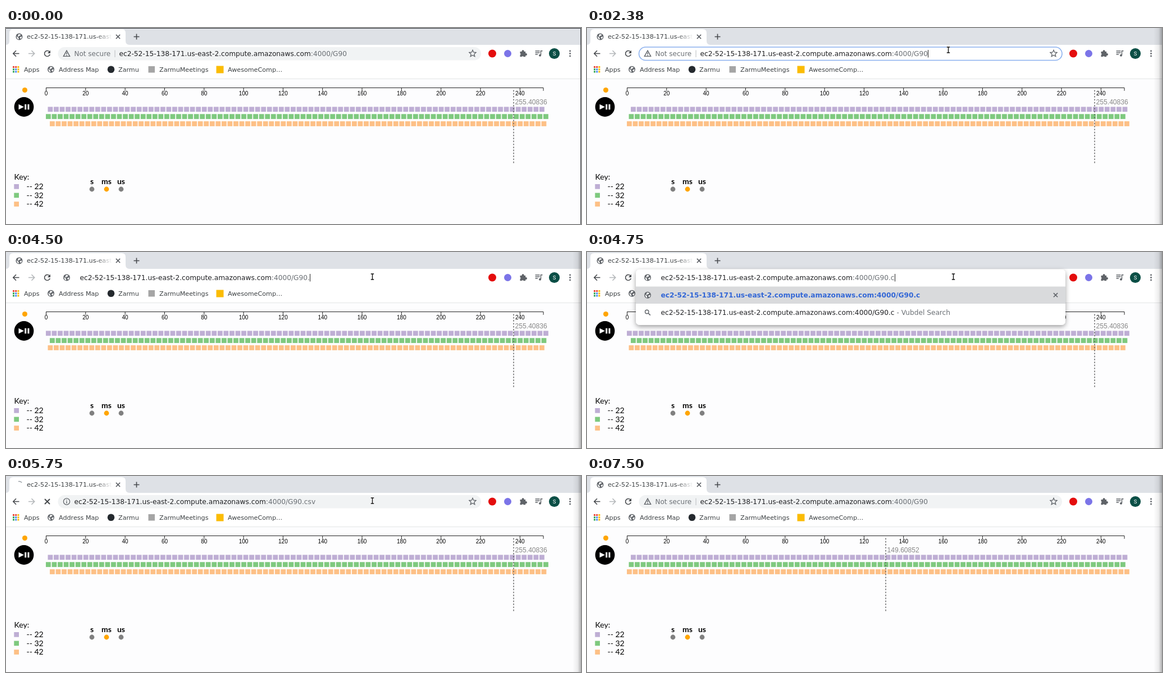
Animation, 1024 px wide and 349 px high, one loop 8000 ms. Source, as an HTML page:

```html
<!DOCTYPE html>
<html lang="en">
<head>
<meta charset="utf-8">
<title>Timeline viewer</title>
<style>
html, body { margin: 0; width: 100%; height: 100%; overflow: hidden; background: #fff; }
svg { display: block; width: 1024px; height: 349px; }
text { white-space: pre; }
.ui { font-family: "DejaVu Sans", sans-serif; font-size: 11.15px; fill: #3c4043; }
.url { font-family: "DejaVu Sans", sans-serif; font-size: 12.2px; fill: #202124; }
.dim { fill: #6b7075; }
.pick { font-weight: bold; fill: #3367d6; }
.axis { font-family: "Liberation Sans", Arial, sans-serif; font-size: 10px; text-anchor: middle; }
.value { font-family: "Liberation Sans", Arial, sans-serif; font-size: 12.1px; fill: #888; }
.key { font-family: Lato, sans-serif; font-size: 14px; }
.unit { font-weight: bold; text-anchor: middle; }
.line { fill: none; stroke: #5f6368; stroke-width: 1.6; }
.dark { stroke: #46494d; }
</style>
</head>
<body>
<svg id="stage" viewBox="0 0 1024 349">
  <defs>
    <linearGradient id="edge"><stop offset="0" stop-opacity="0"/><stop offset=".6" stop-opacity=".07"/><stop offset="1" stop-opacity=".3"/></linearGradient>
    <linearGradient id="fade"><stop offset="0" stop-color="#fff" stop-opacity="0"/><stop offset="1" stop-color="#fff"/></linearGradient>
    <filter id="shadow" x="-10%" y="-20%" width="120%" height="150%"><feDropShadow dx="0" dy="3" stdDeviation="4" flood-opacity=".38"/></filter>
    <clipPath id="titleClip"><rect x="30" y="4" width="158" height="24"/></clipPath>
    <g id="globe">
      <circle r="6" fill="#5f6368"/>
      <path d="M-4.6-1.6Q-3.6 1-1.6 1.2L-.8 3.2-1 5Q-4.8 3.6-4.6-1.6ZM-1-4.8 3-3.8 1.6-1.8-.4-1.4-1 .2-2.6-.8-1.8-3ZM2.4.2 4.8-.2Q4.8 2.6 2.6 4L1 1.6Z" fill="#fff"/>
    </g>
    <path id="cross" d="M-3.6-3.6 3.6 3.6M3.6-3.6-3.6 3.6"/>
  </defs>

  <rect width="1024" height="349" fill="#fdfdfe"/>
  <rect id="strip" width="1024" height="31" fill="#dee1e6"/>
  <path d="M0 30Q6 30 6 23V9Q6 2 13 2H206Q213 2 213 9V23Q213 30 220 30V31H0Z" fill="#fff"/>
  <rect y="30" width="1024" height="60.5" fill="#fff"/>
  <rect y="90" width="1024" height="1" fill="#e3e4e6"/>
  <use id="favicon" href="#globe" x="23.5" y="15.5"/>
  <path id="spinner" class="line" d="M-1.5-5.8A6 6 0 0 1 4.6-3.8" style="stroke:#9aa0a6"/>
  <text class="ui" x="37" y="19.3" clip-path="url(#titleClip)">ec2-52-15-138-171.us-east-2.compute</text>
  <rect x="160" y="6" width="29" height="20" fill="url(#fade)"/>
  <use class="line" href="#cross" x="199.5" y="15.5"/>
  <path class="line dark" d="M227.5 15.5H237.5M232.5 10.5V20.5"/>

  <path class="line dark" d="M23.5 45.5H13M18 40.3 12.8 45.5 18 50.7"/>
  <path class="line" d="M40 45.5H50.5M45.5 40.3 50.7 45.5 45.5 50.7" style="stroke:#b4b7ba"/>
  <g id="reload"><path class="line dark" d="M77.3 42.2A5 5 0 1 0 78.3 47"/><path d="M79 39.8V45H73.8Z" fill="#46494d"/></g>
  <use id="stop" class="line dark" href="#cross" transform="translate(73.5 45.5) scale(1.25)"/>

  <rect id="pill" x="92.5" y="34" width="753.5" height="23.5" rx="11.75"/>
  <g id="star"><path class="line" style="stroke-width:1.3" d="M831 39.3 832.7 43.2 837 43.6 833.8 46.4 834.8 50.6 831 48.4 827.2 50.6 828.2 46.4 825 43.6 829.3 43.2Z"/></g>

  <circle cx="866" cy="45.5" r="7" fill="#e40d0d"/>
  <circle cx="893.5" cy="45.5" r="6.5" fill="#7b74e8"/>
  <path d="M915.5 42H918.6A2.1 2.1 0 1 1 922.6 42H925.2V45A2.1 2.1 0 1 1 925.2 49V51.3H921.8A1.9 1.9 0 0 0 918.3 51.3H915.5V48A1.8 1.8 0 0 0 915.5 44.8Z" fill="#5f6368"/>
  <path class="line" style="stroke-width:1.4" d="M942.5 41H950.5M942.5 44H950.5M942.5 47H947M952.5 48.5V40.7H955.5"/>
  <circle cx="951" cy="48.7" r="2" fill="#5f6368"/>
  <circle cx="976.5" cy="45.5" r="9.6" fill="#0b4f46"/>
  <text x="976.5" y="49" text-anchor="middle" fill="#fff" font-size="9.5" font-family="Roboto, sans-serif">S</text>
  <g fill="#5f6368"><circle cx="1004.5" cy="41" r="1.4"/><circle cx="1004.5" cy="45.5" r="1.4"/><circle cx="1004.5" cy="50" r="1.4"/></g>

  <g id="apps"></g>
  <use href="#globe" x="80" y="73.7"/>
  <circle cx="187" cy="73.7" r="6.3" fill="#24292e"/>
  <rect x="253.5" y="68" width="11.5" height="11.5" fill="#a5a5a5"/>
  <rect x="374.5" y="67.5" width="13" height="13" fill="#fbbc04"/>
  <g class="ui">
    <text x="32" y="77.6">Apps</text><text x="94" y="77.6">Address Map</text>
    <text x="200" y="77.6">Zarmu</text><text x="273" y="77.6">ZarmuMeetings</text>
    <text x="395" y="77.6">AwesomeComp…</text>
  </g>

  <g id="chart">
    <circle cx="33.5" cy="110.5" r="4.5" fill="orange"/>
    <circle cx="32" cy="140.5" r="17.4"/>
    <path d="M22.5 135.7 32 140.5 22.5 145.3ZM33.3 135.7H36.2V145.3H33.3ZM38.5 135.7H41.4V145.3H38.5Z" fill="#fff"/>
  </g>
  <g id="rows"></g>
  <g id="marker">
    <path d="M0 110.5V242.5" fill="none" stroke="#555" stroke-width="1.3" stroke-dasharray="2.7 2.6"/>
    <text id="reading" class="value" x="2.6" y="136.2"></text>
  </g>
  <g id="legend"><text class="key" x="14.5" y="270">Key:</text></g>

  <g id="dropdown">
    <rect x="87" y="31" width="765" height="99" rx="7" fill="#fff" filter="url(#shadow)"/>
    <rect x="87" y="61.5" width="765" height="30.5" fill="#d9dadc"/>
    <use href="#globe" x="108" y="76.7"/>
    <text id="best" class="url pick" x="131.5" y="81"></text>
    <use class="line" href="#cross" x="834.5" y="76.7"/>
    <circle class="line" cx="106.7" cy="106.5" r="3.2" style="stroke-width:1.4"/><path class="line" d="M109.2 109 112.8 112.6"/>
    <text class="url" x="131.5" y="112"><tspan id="query"></tspan><tspan class="dim"> - Vubdel Search</tspan></text>
  </g>

  <g id="insecure">
    <path class="line" style="stroke-width:1.4" d="M108 40.2 113.6 50.4H102.4ZM108 43.6V47M108 48V49.4"/>
    <text class="url dim" style="font-size:12px" x="121.5" y="50">Not secure</text>
    <path d="M194 39.5V52" stroke="#b8bbbf"/>
  </g>
  <g id="info"><circle class="line" cx="108" cy="45.5" r="5.6" style="stroke-width:1.3"/><path class="line" style="stroke-width:1.4" d="M108 42.2V43.6M108 44.8V48.8"/></g>
  <use id="editIcon" href="#globe" x="108" y="45.5"/>
  <text id="address" class="url" y="50">ec2-52-15-138-171.us-east-2.compute.amazonaws.com<tspan id="path" class="dim"></tspan></text>
  <rect id="caret" y="39" width="1" height="13.5" fill="#222"/>

  <rect id="edgeShade" x="1009" width="15" height="349" fill="url(#edge)"/>
  <path id="idleFrame" d="M0 .5H1023.5V349" fill="none" stroke="#33363b"/>
  <path id="arrow" d="M0 0V14.2L3.3 11.2 5.6 16.4 8 15.3 5.7 10.3H9.8Z" fill="#fff" stroke="#111" stroke-width="1.1"/>
  <g id="beam" fill="none"><path d="M-2.7-5H2.7M0-5V5M-2.7 5H2.7" stroke="#fff" stroke-width="3"/><path d="M-2.7-5H2.7M0-5V5M-2.7 5H2.7" stroke="#111" stroke-width="1.4"/></g>
</svg>
<script>
const LOOP = 8000, STEP = 125, UNIT = 3.516, LEFT = 71.3;
const HOST = 'ec2-52-15-138-171.us-east-2.compute.amazonaws.com';
const COLORS = ['#beaed4', '#7fc97f', '#fdc086'];
const $ = id => document.getElementById(id);

function add(parent, tag, attrs, text) {
  const el = document.createElementNS('http://www.w3.org/2000/svg', tag);
  for (const name in attrs) el.setAttribute(name, attrs[name]);
  if (text !== undefined) el.textContent = text;
  return parent.appendChild(el);
}
const show = (id, on) => $(id).style.display = on ? '' : 'none';
const move = (id, x, y) => $(id).setAttribute('transform', `translate(${x} ${y})`);

['#ea4335', '#ea4335', '#fbbc04', '#34a853', '#4285f4', '#fbbc04', '#34a853', '#4285f4', '#fbbc04'].forEach((fill, i) =>
  add($('apps'), 'rect', { x: 12 + i % 3 * 4.2, y: 68 + Math.floor(i / 3) * 4.2, width: 3, height: 3, fill }));

// Axis
let axis = `M71.5 111.8V106.5H957V111.8`;
for (let v = 0; v <= 240; v += 20) {
  const x = 71.5 + v * UNIT;
  axis += `M${x} 106.5V111.8`;
  add($('chart'), 'text', { class: 'axis', x, y: 120 }, v);
}
add($('chart'), 'path', { d: axis, fill: 'none', stroke: '#222', 'stroke-width': 1 });

// Each row holds every third slot; the rows take turns
const slots = COLORS.map((fill, row) => [0, 1, 2].map(offset => {
  const group = add($('rows'), 'g', { fill });
  for (let v = offset; v <= 252; v += 3)
    add(group, 'rect', { x: LEFT + v * UNIT - .3, y: 140.4 + row * 12.85, width: 8.8, height: 8.8 });
  return group;
}));

COLORS.forEach((fill, i) => {
  add($('legend'), 'rect', { x: 14.3, y: 278 + i * 15.6, width: 8.7, height: 8.7, fill });
  add($('legend'), 'text', { class: 'key', x: 36.5, y: 287 + i * 15.6 }, `-- ${22 + i * 10}`);
});
['s', 'ms', 'us'].forEach((unit, i) => {
  const x = 153 + i * 26;
  add($('legend'), 'text', { class: 'key unit', x, y: 278 }, unit);
  add($('legend'), 'circle', { cx: x, cy: 287, r: 4.4, fill: i === 1 ? 'orange' : 'gray' });
});

// Last table entry whose time has come
const at = (table, t) => table.filter(row => row[0] <= t).pop()[1];
const SHIFT = [[0, 1], [1375, 2], [3375, 0], [5500, 1], [7500, 2]];
const MODE = [[0, 'view'], [2125, 'focus'], [4375, 'edit'], [5500, 'load'], [6125, 'view']];
const PATH = [[0, '/G90'], [4375, '/G90.'], [4625, '/G90.c'], [4875, '/G90.cs'], [5125, '/G90.csv'], [6125, '/G90']];
const MARK = [[0, [904, '255.40836']], [6750, [532, '149.60852']]];
const POINTER = [
  [750, 1012, 98], [1000, 800, 78], [1250, 673.5, 64], [1500, 668, 60], [1875, 650, 47],
  [2250, 643.5, 39], [2500, 643.5, 39], [2875, 652.5, 44], [6500, 652.5, 44], [6625, 612, 95], [6750, 536, 215]
];

function pointerAt(t) {
  const i = POINTER.findIndex(p => p[0] >= t);
  if (i < 0 || t < POINTER[0][0]) return null;
  const b = POINTER[i], a = POINTER[Math.max(0, i - 1)];
  const k = b === a ? 0 : (t - a[0]) / (b[0] - a[0]);
  return [a[1] + (b[1] - a[1]) * k, a[2] + (b[2] - a[2]) * k];
}

function render(t) {
  const mode = at(MODE, t), focused = mode === 'focus', editing = mode === 'edit', loading = mode === 'load';
  const idle = t < 750;
  show('idleFrame', idle);
  show('edgeShade', !idle);

  const shift = at(SHIFT, t);
  slots.forEach((groups, row) => groups.forEach((group, offset) =>
    group.style.display = offset === (shift + row * 2) % 3 ? '' : 'none'));

  const [x, reading] = at(MARK, t);
  move('marker', x, 0);
  $('reading').textContent = reading;

  show('favicon', !loading);
  show('spinner', loading);
  $('spinner').setAttribute('transform', `translate(23.5 15.5) rotate(${(5750 - t) * .36})`);
  show('reload', !loading);
  show('stop', loading);
  show('insecure', mode === 'view' || focused);
  show('info', loading);
  show('editIcon', editing);
  show('star', !editing);
  show('dropdown', editing && t >= 4625);

  const pill = $('pill');
  pill.setAttribute('fill', focused || editing ? '#fff' : '#f1f3f4');
  pill.setAttribute('stroke', focused ? '#8ab0ee' : 'none');
  pill.setAttribute('stroke-width', 1.6);

  const path = ':4000' + at(PATH, t);
  const start = editing ? 131.5 : loading ? 121.5 : 201.5;
  $('path').textContent = path;
  $('address').setAttribute('x', start);
  $('best').textContent = $('query').textContent = HOST + path;
  const lit = editing || (focused && Math.floor((t - 2375) / 500) % 2 === 0);
  show('caret', lit);
  if (lit) $('caret').setAttribute('x', Math.round(start + $('address').getComputedTextLength()));

  const pointer = pointerAt(t);
  const overText = pointer && pointer[1] < 57;
  show('arrow', pointer && !overText);
  show('beam', overText);
  if (pointer) move(overText ? 'beam' : 'arrow', ...pointer);
}

function tick() {
  render(Math.floor(performance.now() % LOOP / STEP) * STEP);
  requestAnimationFrame(tick);
}
tick();
</script>
</body>
</html>
```
